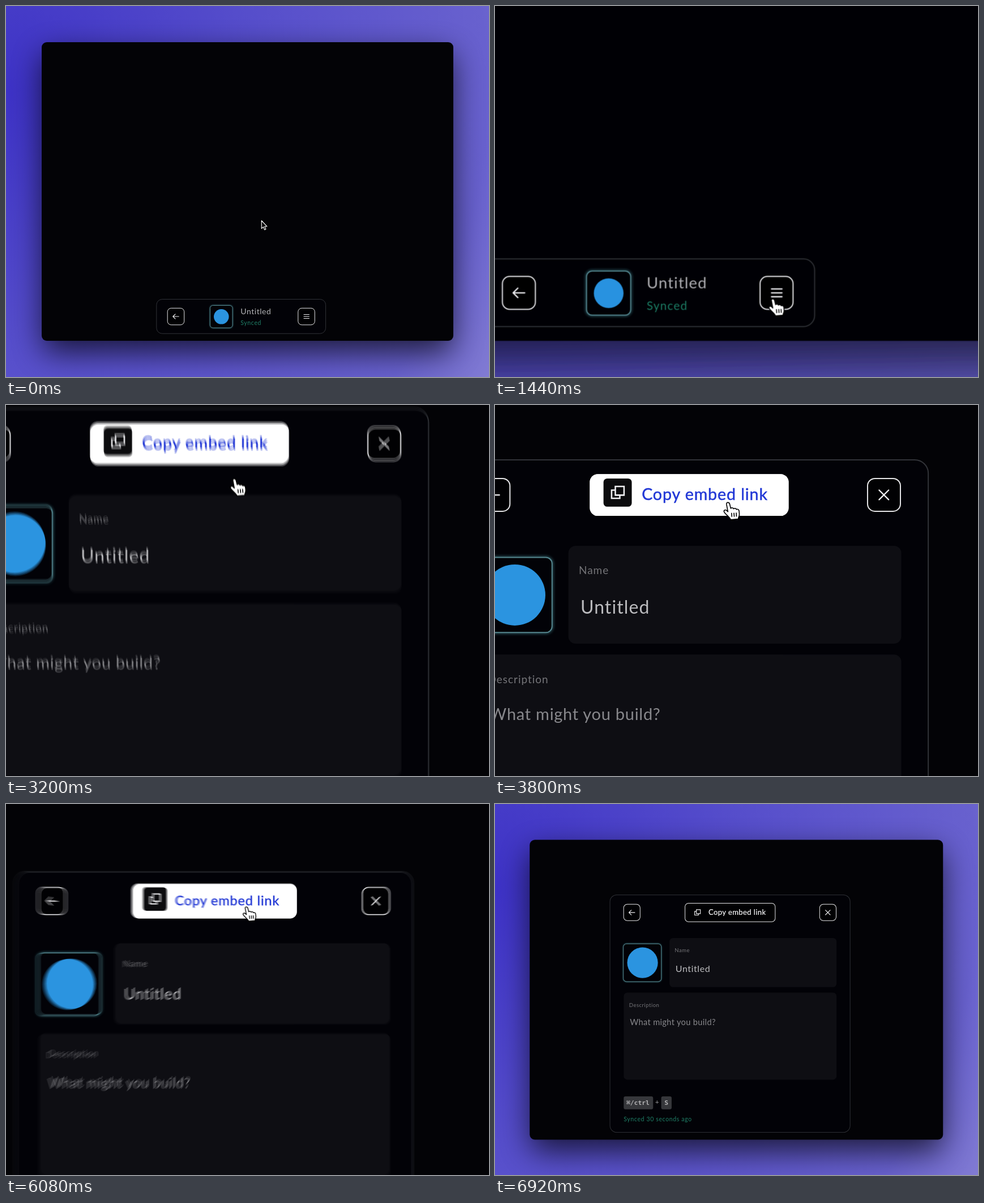
An HTML page for the animation above (6960 ms loop, 853 by 656 pixels).

```html
<!DOCTYPE html>
<html lang="en">
<head>
<meta charset="utf-8">
<title>Copy embed link</title>
<style>
  html, body { margin: 0; width: 100%; height: 100%; overflow: hidden; background: #4a40c8; }
  svg { display: block; width: 100vw; height: 100vh; }
  text { font-family: Lato, "Open Sans", sans-serif; white-space: pre; }
  .btn { fill: #010103; stroke: #e6e6e8; stroke-width: 1; }
  .line { fill: none; stroke: #f0f0f2; stroke-width: 1.15; stroke-linecap: round; stroke-linejoin: round; }
  .field { fill: #0e0e13; }
  .label { font-size: 9.5px; letter-spacing: .48px; fill: #747478; }
  .sync { font-size: 10.5px; letter-spacing: .62px; fill: #208068; }
  .key { fill: #36373b; }
  .mono { font: bold 11.3px "DejaVu Sans Mono", monospace; fill: #b4b4b6; }
  .frame { fill: #020207; stroke: #55878f; stroke-width: 1; }
  .glow { fill: none; stroke: #4e9aa4; stroke-width: 2; opacity: .6; }
  .badge { fill: #2b94e0; }
</style>
</head>
<body>
<svg id="stage" viewBox="0 0 853 656">
  <defs>
    <radialGradient id="sky" gradientUnits="userSpaceOnUse" cx="0" cy="150" r="1000">
      <stop offset="0" stop-color="#3d32c6"/>
      <stop offset=".45" stop-color="#564ecb"/>
      <stop offset=".85" stop-color="#6861ce"/>
      <stop offset="1" stop-color="#837dd3"/>
    </radialGradient>
    <filter id="soft" x="-20%" y="-20%" width="140%" height="150%"><feGaussianBlur stdDeviation="27"/></filter>
    <filter id="halo" x="-20%" y="-20%" width="140%" height="140%"><feGaussianBlur stdDeviation="1.3"/></filter>
    <clipPath id="win"><rect x="63" y="64" width="727" height="528" rx="9"/></clipPath>

    <path id="back" class="line" d="M5.2 0H-5.2M-1-4.2L-5.2 0L-1 4.2"/>
    <g id="arrow">
      <path d="M0 0V14L3.2 11.1L5.4 16.2L7.6 15.2L5.5 10.3H9.7Z" fill="#0a0a0c" stroke="#fff" stroke-width="1.1" stroke-linejoin="round"/>
    </g>
    <g id="hand">
      <path d="M-1.7 1.2C-1.9-.5.6-.7 1.1 1L2.1 5C2.7 4.2 4.3 4.3 4.6 5.4C5.4 4.7 6.8 4.9 7.1 6C7.9 5.5 9.2 5.9 9.4 7.1L9.7 9.8C9.9 11.8 8.8 12.6 8.7 14.4L2 15C1.4 13-1.5 11.2-3.5 8.6C-4.7 6.8-2.7 5.7-1.5 6.9L-.4 8Z" fill="#fff" stroke="#000" stroke-width=".8" stroke-linejoin="round"/>
      <path d="M2.8 9l.3 3.5M4.9 8.9l.3 3.5M6.9 8.8l.3 3.5" fill="none" stroke="#000" stroke-width=".8"/>
    </g>

    <g id="world">
      <rect x="-20" y="-20" width="893" height="696" fill="url(#sky)"/>
      <rect x="65" y="84" width="723" height="528" rx="12" opacity=".7" filter="url(#soft)"/>
      <rect x="63" y="64" width="727" height="528" rx="9" fill="#030306"/>
      <g clip-path="url(#win)">
        <rect id="panel" fill="#020207" stroke="#313338" stroke-width="1"/>

        <g id="bar">
          <rect class="btn" x="285.2" y="534.3" width="29.5" height="29.5" rx="6.5"/>
          <use href="#back" x="300" y="549"/>
          <rect class="glow" x="360.5" y="529.5" width="39.5" height="39.5" rx="5" filter="url(#halo)"/>
          <rect class="frame" x="360.5" y="529.5" width="39.5" height="39.5" rx="5"/>
          <circle class="badge" cx="380.3" cy="549.3" r="13.3"/>
          <text x="414.3" y="545" font-size="14" letter-spacing=".55" fill="#b4b4b7">Untitled</text>
          <text class="sync" x="414.3" y="564.3">Synced</text>
          <rect class="btn" x="515.8" y="534.3" width="29.5" height="29.5" rx="6.5"/>
          <path class="line" d="M526 545.5h9.4M526 549h9.4M526 552.5h9.4"/>
        </g>

        <g id="content">
          <rect class="btn" x="228.2" y="177.4" width="29" height="29" rx="6.5"/>
          <use href="#back" x="242.7" y="192"/>
          <rect class="btn" x="573" y="177.4" width="29" height="29" rx="6.5"/>
          <path class="line" d="M583.2 187.7l8.4 8.4m0-8.4l-8.4 8.4"/>

          <g id="copy">
            <rect class="btn" x="336.2" y="175.7" width="158.6" height="32.6" rx="6"/>
            <rect id="lit" x="335.7" y="175.2" width="159.6" height="33.6" rx="6.5" fill="#fff"/>
            <g id="glyph">
              <rect id="chip" x="346.7" y="180.6" width="22.7" height="22.7" rx="3" fill="#0c0c0e"/>
              <path id="pages" class="line" d="M356.2 187h7v7h-7zM356.2 190h-3v6.6h6.6v-2.6" style="stroke-linejoin:miter"/>
              <path id="tick" class="line" d="M355.3 191.8l1.9 1.9l3.7-3.9"/>
            </g>
            <text id="caption" x="377.4" y="196.1" font-size="13" letter-spacing=".41" stroke-width=".22">Copy embed link</text>
          </g>

          <rect class="glow" x="227.8" y="247.2" width="66.6" height="66.4" rx="5.5" filter="url(#halo)"/>
          <rect class="frame" x="227.8" y="247.2" width="66.6" height="66.4" rx="5.5"/>
          <circle class="badge" cx="261.5" cy="280.4" r="27"/>

          <rect class="field" x="308.8" y="236.9" width="294" height="86.5" rx="6.5"/>
          <text class="label" x="318" y="262">Name</text>
          <text x="319.5" y="296.7" font-size="16" letter-spacing=".55" fill="#bcbcbf">Untitled</text>

          <rect class="field" x="228.3" y="333" width="374.5" height="153.4" rx="6.5"/>
          <text class="label" x="237.8" y="358.4">Description</text>
          <text x="239.2" y="390.7" font-size="14.5" letter-spacing=".36" fill="#88888c">What might you build?</text>

          <rect class="key" x="228.3" y="515.8" width="51.8" height="22.8" rx="3"/>
          <text class="mono" x="233" y="530.4">⌘/ctrl</text>
          <text x="283.6" y="530" font-size="12" fill="#9a9a9e">+</text>
          <rect class="key" x="294.3" y="515.8" width="18.4" height="22.8" rx="3"/>
          <text class="mono" x="300" y="530.4">S</text>
          <text class="sync" x="228.3" y="559.5">Synced 30 seconds ago</text>
        </g>
      </g>
    </g>
  </defs>
</svg>
<script>
const LOOP = 6960, STEP = 40, SHUTTER = 13, SAMPLES = 6;
const NS = 'http://www.w3.org/2000/svg';
const $ = id => document.getElementById(id);
const set = (el, attrs) => { for (const k in attrs) el.setAttribute(k, attrs[k]); };
const clamp = v => Math.min(1, Math.max(0, v));
const mix = (a, b, p) => a + (b - a) * p;
const ramp = (t, from, length) => clamp((t - from) / length);

// Critically damped spring from 0 to 1, rate w per second.
function spring(t, start, w) {
  const x = Math.max(0, t - start) / 1000 * w;
  return 1 - (1 + x) * Math.exp(-x);
}

// Each value chases one target after another.
function chase(t, first, moves) {
  return moves.reduce((v, [start, to, w]) => mix(v, to, spring(t, start, w)), first);
}

const camera = t => ({
  s: chase(t, 1, [[725, 2, 7.7], [5923, 1, 7.7]]),
  x: chase(t, 0, [[725, -564.8, 7.7], [2851, -487.6, 7.7], [5923, 0, 7.7]]),
  y: chase(t, 0, [[725, -592, 7.7], [2851, -222.8, 7.7], [5923, 0, 7.7]])
});

const pointer = t => ({
  x: chase(t, 451.3, [[715, 529.3, 7.9], [2650, 450, 7.9], [6150, 460, 7.9]]),
  y: chase(t, 379.5, [[500, 555.5, 7.9], [2650, 198.4, 7.9], [6150, 559, 7.9]])
});

const isHand = t => (t >= 1110 && t < 2600) || (t >= 3020 && t < 6220);

// Stacked sub-frame copies give the motion blur; weights average evenly.
const layers = Array.from({ length: SAMPLES }, (_, i) => {
  const g = document.createElementNS(NS, 'g');
  const scene = document.createElementNS(NS, 'use');
  const cursor = document.createElementNS(NS, 'use');
  set(scene, { href: '#world' });
  set(g, { opacity: 1 / (i + 1) });
  g.append(scene, cursor);
  $('stage').append(g);
  return { g, cursor };
});

function drawPanel(t) {
  const wide = spring(t, 1840, 30);
  const top = mix(518.6, 160.9, spring(t, 1840, 14));
  const left = mix(265.8, 204.2, wide), right = mix(564.6, 626.6, wide);
  set($('panel'), { x: left, y: top, width: right - left, height: 579.2 - top, rx: mix(10, 12, wide) });
  set($('bar'), { opacity: 1 - ramp(t, 1840, 80) });
  set($('content'), {
    opacity: ramp(t, 1880, 280),
    transform: `translate(0 ${top - 160.9})`
  });
}

function drawCopy(t) {
  const h = ramp(t, 3020, 140) - ramp(t, 6220, 140);
  const done = t >= 4400 && t < 5700;
  const ink = `rgb(${mix(245, 34, h)},${mix(245, 56, h)},${mix(247, 214, h)})`;
  set($('copy'), { transform: `translate(415.5 192) scale(${1 + .1 * h}) translate(-415.5 -192)` });
  set($('lit'), { opacity: h });
  set($('chip'), { opacity: h });
  set($('glyph'), { transform: `translate(0 ${-1.9 * h})` });
  set($('pages'), { opacity: done ? 0 : 1 });
  set($('tick'), { opacity: done ? 1 : 0 });
  set($('caption'), { fill: ink, stroke: ink });
}

function drawLayers(t) {
  const shape = isHand(t) ? '#hand' : '#arrow';
  const shown = 1 - ramp(t, 6480, 160);
  const a = camera(t - SHUTTER / 2), b = camera(t + SHUTTER / 2);
  const p = pointer(t - SHUTTER / 2), q = pointer(t + SHUTTER / 2);
  const still = Math.abs(a.x - b.x) + Math.abs(a.y - b.y) + Math.abs(p.x - q.x) + Math.abs(p.y - q.y) < .3;
  layers.forEach(({ g, cursor }, i) => {
    g.style.display = still && i ? 'none' : '';
    const at = still ? t : t + (i / (SAMPLES - 1) - .5) * SHUTTER;
    const c = camera(at), m = pointer(at);
    set(g, { transform: `translate(${c.x} ${c.y}) scale(${c.s})` });
    set(cursor, { href: shape, x: m.x, y: m.y, opacity: shown });
  });
}

const begin = performance.now();
let last = -1;
function tick() {
  const t = Math.floor((performance.now() - begin) % LOOP / STEP) * STEP;
  if (t !== last) {
    last = t;
    drawPanel(t);
    drawCopy(t);
    drawLayers(t);
  }
  requestAnimationFrame(tick);
}
tick();
</script>
</body>
</html>
```
